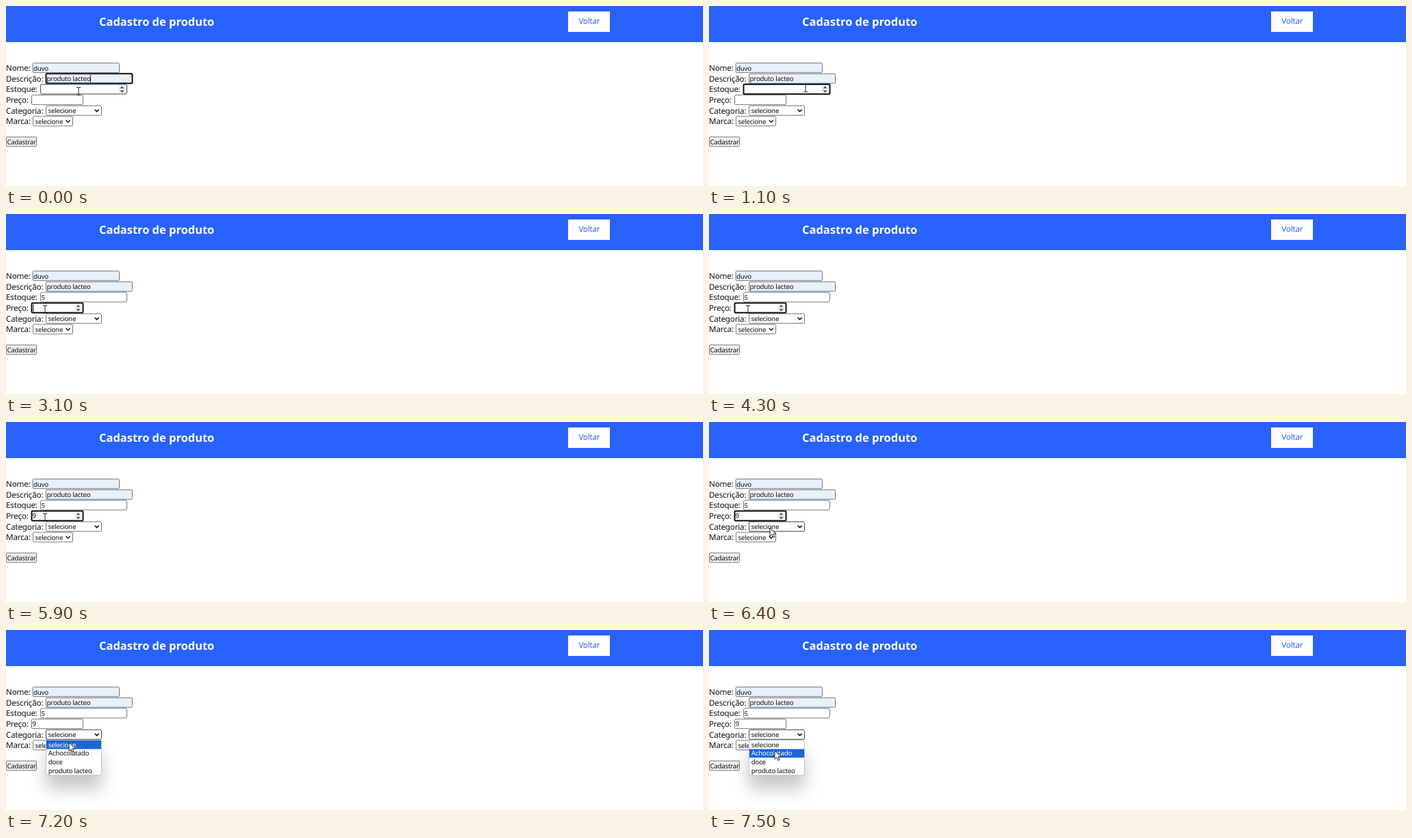
An HTML page for the animation above (8000 ms loop, 1018 px wide and 264 px high).

```html
<!DOCTYPE html>
<html lang="pt">
<head>
<meta charset="utf-8">
<title>Cadastro de produto</title>
<style>
html, body { margin: 0; width: 100%; height: 100%; overflow: hidden; background: #fff; }
svg { display: block; width: 1018px; height: 264px; }
text { font-family: "Noto Sans", "Open Sans", sans-serif; text-rendering: geometricPrecision; fill: #111; white-space: pre; }
.title { font-size: 16.45px; font-weight: 700; fill: #fff; }
.label { font-size: 11.7px; letter-spacing: -.22px; }
.small { font-size: 9.75px; letter-spacing: -.25px; }
.link { fill: #2962ff; }
.box { stroke: #767676; stroke-width: 1; fill: #fff; }
.auto { fill: #e8f0fe; }
.hover { stroke: #444; }
.ring { fill: none; stroke: #101010; stroke-width: 2; }
.chevron { fill: none; stroke: #111; stroke-width: 1.5; }
.menu { filter: drop-shadow(0 20px 12px rgba(0, 0, 0, .22)); }
</style>
</head>
<body>
<svg id="stage" viewBox="0 0 1018 264"></svg>
<script>
const LOOP = 8000, STEP = 100;
const stage = document.getElementById('stage');

function add(tag, attrs, parent = stage) {
  const node = document.createElementNS('http://www.w3.org/2000/svg', tag);
  for (const key in attrs) node.setAttribute(key, attrs[key]);
  return parent.appendChild(node);
}
function write(x, y, str, cls, parent) {
  const node = add('text', { x, y, class: cls }, parent);
  node.textContent = str;
  return node;
}
const rect = (x, y, width, height, attrs, parent) =>
  add('rect', { x, y, width, height, ...attrs }, parent);
const show = (node, on) => node.setAttribute('visibility', on ? 'visible' : 'hidden');

// Header
rect(0, 0, 1018, 53, { fill: '#2962ff' });
write(136, 28.8, 'Cadastro de produto', 'title');
rect(821, 8, 61, 30, { fill: '#fff' });
write(836.3, 26, 'Voltar', 'label link');

// Form rows
function field(row, label, x, w, value = '', cls = '') {
  const y = 83.5 + row * 15.65;
  write(0, y + 11.6, label, 'label');
  const box = rect(x + .5, y + .2, w - 1, 14, { rx: 1.5, class: 'box ' + cls });
  const text = write(x + 1.6, y + 11, value, 'small');
  const ring = rect(x + .5, y, w - 1, 14.4, { rx: 1.5, class: 'ring' });
  show(ring, false);
  return { x, y, w, box, text, ring };
}
function spinner(f) {
  const cx = f.x + f.w - 7.5, cy = f.y + 7.4;
  const g = add('g', {});
  rect(cx - 5, cy - 5.5, 10, 11, { fill: '#efefef' }, g);
  add('path', { d: `M${cx - 3} ${cy - 1.5}h6l-3-3.2zM${cx - 3} ${cy + 1.5}h6l-3 3.2z`, fill: '#505050' }, g);
  return g;
}
function select(row, label, x, w) {
  const f = field(row, label, x, w, 'selecione');
  f.text.setAttribute('x', x + 3.6);
  add('path', { d: `M${x + w - 10.3} ${f.y + 5.8}l3 3 3-3`, class: 'chevron' });
  return f;
}

field(0, 'Nome:', 38.5, 127.5, 'duvo', 'auto');
const desc = field(1, 'Descrição:', 58, 127, 'produto lacteo', 'auto');
const stock = field(2, 'Estoque:', 50, 127);
const price = field(3, 'Preço:', 37, 76);
const category = select(4, 'Categoria:', 58, 82);
select(5, 'Marca:', 39, 59);
const stockSpin = spinner(stock), priceSpin = spinner(price);

rect(.5, 192, 44, 14, { rx: 1.5, class: 'box', style: 'fill:#efefef' });
write(1.4, 202.7, 'Cadastrar', 'small');

const caret = rect(0, 0, 1, 11, { fill: '#111' });

// Category list
const menu = add('g', { class: 'menu' });
rect(58.5, 161.5, 81, 51.5, { rx: 3, fill: '#fff', stroke: '#b8b8b8', 'stroke-width': .8 }, menu);
const mark = rect(59, 162, 80, 12.6, { fill: '#1967d2' }, menu);
const options = ['selecione', 'Achocolatado', 'doce', 'produto lacteo']
  .map((name, i) => write(61.8, 171.7 + i * 12.6, name, 'small', menu));

// Pointers
const beam = add('path', {
  d: 'M-3-5.5h2L0-5l1-.5h2M0-5V5M-3 5.5h2L0 5l1 .5h2',
  fill: 'none', stroke: '#222', 'stroke-width': 1
});
const arrow = add('path', {
  d: 'M0 0V12.5L2.9 9.8 4.9 14.3 7 13.4 5 9H9Z',
  fill: '#fff', stroke: '#111', 'stroke-width': .9
});

// time, x, y, pointer
const moves = [
  [0, 106, 125, beam], [100, 106, 123.5, beam], [200, 106, 122, beam],
  [800, 114, 121.5, beam], [900, 130, 121, beam], [1000, 143, 120.5, beam], [1100, 141, 120.5, beam],
  [2600, 137.5, 120, beam], [2700, 130, 125, beam], [2800, 106, 138, beam],
  [2900, 80, 145, beam], [3000, 62, 142, beam], [3100, 57, 140, beam],
  [6000, 60, 142, beam], [6100, 68, 147, arrow], [6200, 78, 151, arrow],
  [6300, 86, 154, arrow], [6400, 89, 155, arrow],
  [7100, 90, 159, arrow], [7200, 92, 165, arrow], [7300, 94, 171, arrow],
  [7400, 95.5, 175, arrow], [7500, 96, 177, arrow]
];
// from, to, x, field
const carets = [
  [0, 300, 122.8, desc], [300, 800, 52, stock], [1800, 2100, 57, stock],
  [3100, 3500, 39.5, price], [3900, 4300, 39.5, price], [4900, 5200, 44.8, price]
];

function render(time) {
  const t = Math.floor(time % LOOP / STEP) * STEP;
  const within = (a, b) => t >= a && t < b;

  show(desc.ring, t < 300);
  show(stock.ring, within(300, 3100));
  show(price.ring, within(3100, 6600));
  show(stockSpin, t < 3100);
  show(priceSpin, within(2800, 6600));
  stock.box.classList.toggle('hover', t < 300);
  category.box.classList.toggle('hover', t >= 6200);
  stock.text.textContent = t >= 1800 ? '5' : '';
  price.text.textContent = t >= 4900 ? '9' : '';

  const c = carets.find(([a, b]) => within(a, b));
  show(caret, c);
  if (c) {
    caret.setAttribute('x', c[2]);
    caret.setAttribute('y', c[3].y + 1.8);
  }

  const open = t >= 6600, picked = t >= 7300 ? 1 : 0;
  menu.style.display = open ? '' : 'none';
  mark.setAttribute('y', 162 + picked * 12.6);
  options.forEach((o, i) => {
    o.style.fill = i === picked ? '#fff' : '';
    o.style.fontWeight = i === picked ? 500 : 400;
  });

  const [, x, y, shape] = moves.filter(m => m[0] <= t).pop();
  show(beam, shape === beam);
  show(arrow, shape === arrow);
  shape.setAttribute('transform', `translate(${x} ${y})`);
}

const start = performance.now();
function tick() {
  render(performance.now() - start);
  requestAnimationFrame(tick);
}
tick();
</script>
</body>
</html>
```
